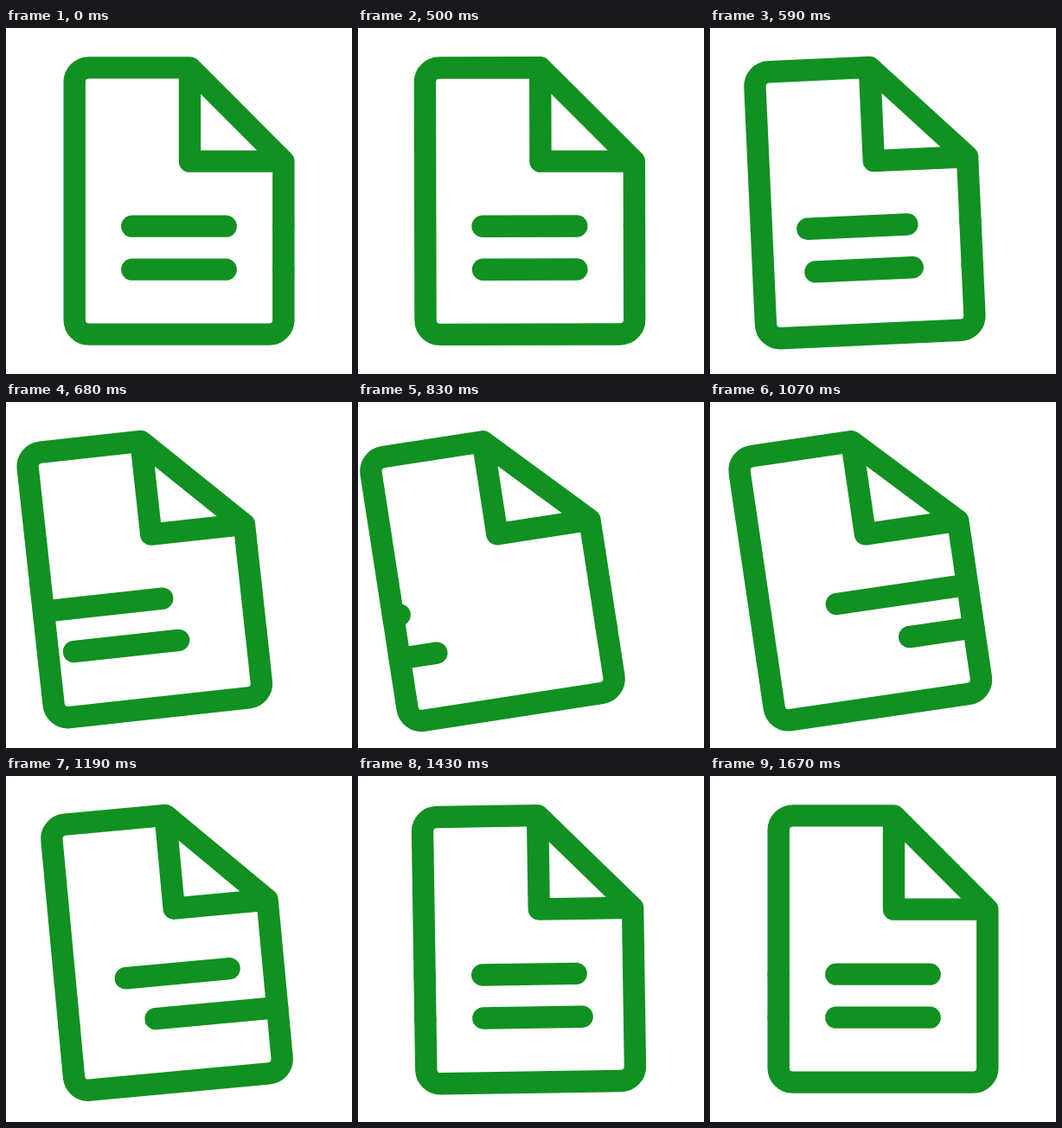
Write an HTML page that moves like this. It is 400x400 px and loops after 1.73 s.

```html
<!DOCTYPE html>
<html lang="en">
<head>
<meta charset="utf-8">
<title>Document icon</title>
<style>
  html, body { margin: 0; width: 100%; height: 100%; overflow: hidden; background: #fff; }
  svg { display: block; width: 100%; height: 100%; }
  path { fill: none; stroke: #109121; stroke-width: 25.4; stroke-linecap: round; stroke-linejoin: round; }
</style>
</head>
<body>
<svg viewBox="0 0 400 400">
  <g id="page">
    <path d="M212.5 45.83H95.83A16.67 16.67 0 0 0 79.17 62.5V337.5A16.67 16.67 0 0 0 95.83 354.17H304.17A16.67 16.67 0 0 0 320.83 337.5V154.17ZV154.17H320.83"/>
    <path id="upper"/>
    <path id="lower"/>
  </g>
</svg>
<script>
const LOOP = 1730, HOLD = 500, STEP = 30, LAST = 40;
const EDGE_LEFT = 79.17, EDGE_RIGHT = 320.83;
const TEXT_LEFT = 145.83, TEXT_RIGHT = 254.17;
const TRAVEL = 175, EXIT_STEPS = 11.2, ENTER_STEPS = 17.6;

// Times are in steps: when each end leaves and when it has settled again.
const rows = [
  { id: 'upper', y: 229.17, leave: [0, 1], settle: [29.75, 32.8] },
  { id: 'lower', y: 279.17, leave: [1, 2], settle: [35, 38.8] }
];

const page = document.getElementById('page');
const clamp = (v, lo, hi) => Math.min(hi, Math.max(lo, v));

// Cubic Bezier easing with control points (x1, 0) and (x2, 1).
function ease(x1, x2, x) {
  if (x <= 0 || x >= 1) return clamp(x, 0, 1);
  let lo = 0, hi = 1, s;
  for (let i = 0; i < 24; i++) {
    s = (lo + hi) / 2;
    const bx = 3 * (1 - s) * (1 - s) * s * x1 + 3 * (1 - s) * s * s * x2 + s ** 3;
    if (bx < x) lo = s; else hi = s;
  }
  return s * s * (3 - 2 * s);
}

function swing(k, peak, there, back) {
  return k < peak
    ? ease(...there, k / peak)
    : 1 - ease(...back, (k - peak) / (LAST - peak));
}

const exitShift = (k, start) => TRAVEL * Math.max(0, (k - start) / EXIT_STEPS) ** 2.5;
const enterShift = (k, end) => TRAVEL * Math.max(0, (end - k) / ENTER_STEPS) ** 3.5;

function segment(left, right, y) {
  const a = clamp(left, EDGE_LEFT, EDGE_RIGHT);
  const b = clamp(right, EDGE_LEFT, EDGE_RIGHT);
  return `M${a} ${y}H${b}`;
}

function draw(k) {
  const shift = -45 * swing(k, 10, [0.33, 0.45], [0.38, 0.27]);
  const angle = -9.2 * swing(k, 16, [0.33, 0.25], [0.37, 0.28]);
  page.setAttribute('transform', `translate(${shift} 0) rotate(${angle} 200 200)`);

  for (const { id, y, leave, settle } of rows) {
    // The part off stage collapses to a dot hidden under the page border.
    const out = segment(TEXT_LEFT - exitShift(k, leave[0]), TEXT_RIGHT - exitShift(k, leave[1]), y);
    const back = segment(TEXT_LEFT + enterShift(k, settle[0]), TEXT_RIGHT + enterShift(k, settle[1]), y);
    document.getElementById(id).setAttribute('d', out + back);
  }
}

const begin = performance.now();
function tick() {
  const t = (performance.now() - begin) % LOOP;
  draw(t < HOLD ? 0 : Math.min(LAST, Math.floor((t - HOLD) / STEP) + 1));
  requestAnimationFrame(tick);
}
tick();
</script>
</body>
</html>
```
